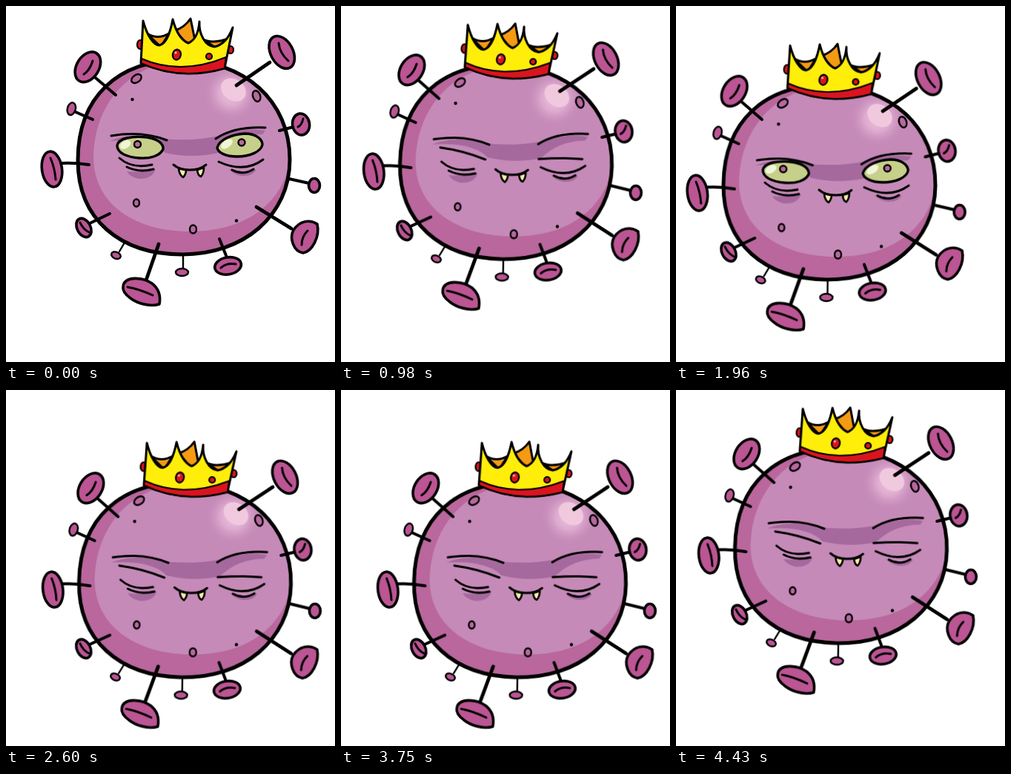
An HTML page that plays this animation: 444 px wide and 480 px high, repeating every 4.6 s.

```html
<!DOCTYPE html>
<html lang="en">
<head>
<meta charset="utf-8">
<title>Crowned virus</title>
<style>
  html, body { margin: 0; width: 100%; height: 100%; overflow: hidden; background: #fff; }
  svg { display: block; width: 444px; height: 480px; }
  .ink { fill: none; stroke: #000; stroke-linecap: round; stroke-linejoin: round; stroke-width: 3; }
  .pin { fill: #bb5593; stroke-width: 3.6; }
  .stem { stroke-width: 4; }
  .thin { stroke-width: 2.4; }
  .spot { fill: #b9689f; stroke-width: 2.4; }
  .shade { fill: #a5699e; }
  .eye { fill: #c6d08a; stroke-width: 3.4; }
  .gem { fill: #d9141f; stroke-width: 2.2; }
  .fang { fill: #f5eea6; stroke-width: 2.6; }

  #virus, #open, #closed { animation: 1150ms step-end infinite; }
  #virus { transform-origin: 240px 210px; animation-name: bob; }
  #open { animation-name: look; }
  #closed { animation-name: shut; }

  @keyframes bob {
    0% { transform: none; }
    11.304% { transform: translate(5px, 24px) rotate(.4deg); }
    26.087% { transform: translate(1.5px, 52.5px) rotate(1.1deg); }
    40.87% { transform: translate(7px, 68px) rotate(.8deg); }
    55.652% { transform: translate(-21.5px, 62.5px) rotate(1deg); }
    70.435% { transform: translate(-33px, 34px) rotate(.6deg); }
    85.217% { transform: translate(-17.5px, 6.5px) rotate(1.1deg); }
  }
  @keyframes look {
    0%, 55.652% { visibility: visible; }
    26.087%, 85.217%, 100% { visibility: hidden; }
  }
  @keyframes shut {
    0%, 55.652% { visibility: hidden; }
    26.087%, 85.217%, 100% { visibility: visible; }
  }
</style>
</head>
<body>
<svg viewBox="0 0 444 480">
  <defs>
    <path id="ball" d="M97 208C97 122 152 73 235 73C322 73 383 128 383 207C383 283 320 335 238 335C154 335 97 288 97 208Z"/>
    <clipPath id="inside"><use href="#ball"/></clipPath>
    <radialGradient id="glow">
      <stop offset="0" stop-color="#efc6e1"/>
      <stop offset=".45" stop-color="#e2b0d3" stop-opacity=".85"/>
      <stop offset="1" stop-color="#c58ab8" stop-opacity="0"/>
    </radialGradient>
  </defs>

  <g id="virus">
    <use href="#ball" fill="#b9679d"/>
    <g clip-path="url(#inside)">
      <path fill="#c58ab8" d="M190 85C142 107 118 155 118 205C119 268 175 304 248 304C320 304 366 270 380 222L395 140L320 60H240Z"/>
      <circle cx="304" cy="117" r="39" fill="url(#glow)"/>
      <ellipse cx="307" cy="113" rx="18" ry="14" transform="rotate(35 307 113)" fill="#f1c9de"/>
    </g>
    <use href="#ball" class="ink" style="stroke-width:5"/>

    <!-- spikes -->
    <g class="ink stem">
      <path d="M121 97L148 120M75 212Q92 211 112 214M113 293L140 280M298 339L288 314M388 163L369 168"/>
      <path d="M356 76L311 107M385 300L338 271M190 367L206 321" stroke-width="4.8"/>
      <path class="thin" d="M153 331L160 319M239 353V338"/>
      <path d="M94 143L117 153M409 239L382 233"/>
    </g>
    <g class="ink pin">
      <ellipse cx="110.500" cy="82" rx="15" ry="22" transform="rotate(32 110 82)"/>
      <ellipse class="thin" cx="88.500" cy="138.500" rx="5.500" ry="8.500" transform="rotate(15 88 138)"/>
      <ellipse cx="62" cy="220" rx="13.500" ry="24" transform="rotate(-8 62 220)"/>
      <ellipse cx="105" cy="299" rx="9" ry="13.500" transform="rotate(-28 105 299)"/>
      <ellipse class="thin" cx="148.500" cy="336" rx="6.500" ry="4.500" transform="rotate(22 148 336)"/>
      <path d="M158 378C160 364 184 365 197 374C206 381 209 391 207 402C195 406 177 401 168 394C161 389 157 384 158 378Z"/>
      <ellipse class="thin" cx="237.500" cy="359" rx="8.500" ry="5"/>
      <ellipse cx="299.500" cy="350.500" rx="18" ry="11.500" transform="rotate(-10 299 350)"/>
      <path d="M420 294C424 311 413 331 401 333C388 331 382 313 388 302C396 290 409 287 420 294Z"/>
      <ellipse cx="416" cy="242" rx="7.500" ry="9.500"/>
      <ellipse cx="398" cy="159.500" rx="11.500" ry="14.500" transform="rotate(-8 398 159)"/>
      <ellipse cx="372" cy="62.500" rx="15" ry="23.500" transform="rotate(-28 372 62)"/>
    </g>
    <path class="ink" d="M105 92Q113 87 117 74M60 205Q66 219 67 234M100 292Q104 301 112 305M164 379Q178 381 198 390M290 353Q298 346 310 348M399 322Q399 311 407 303M394 163Q399 161 401 152M368 50Q369 63 381 74"/>

    <!-- spots -->
    <g class="ink spot">
      <ellipse cx="176" cy="98" rx="7.500" ry="5" transform="rotate(-35 176 98)"/>
      <ellipse cx="338" cy="121.500" rx="5" ry="7.500" transform="rotate(-20 338 121)"/>
      <ellipse cx="176" cy="265.500" rx="4" ry="5"/>
      <ellipse cx="252.500" cy="301" rx="4.500" ry="5.500"/>
    </g>
    <circle cx="170.500" cy="126" r="2.200"/>
    <circle cx="311" cy="289.500" r="2.200"/>

    <!-- face -->
    <path class="shade" d="M140 182Q165 171 200 177Q245 185 292 174Q320 163 350 168L346 173Q310 174 287 198Q250 206 215 198Q195 178 140 182Z"/>
    <path class="shade" d="M163 223Q180 225 202 220Q198 233 180 233Q168 231 163 223ZM301 220Q320 226 338 220Q333 230 318 229Q306 227 301 220Z"/>
    <g class="ink">
      <path d="M153 205Q170 220 197 214M163 217Q179 225 199 220M287 210Q322 226 347 207M305 221Q320 229 334 220"/>
      <path class="fang" d="M233 219Q234 228 239 231Q243 227 243 221ZM258 221Q259 229 263 230Q267 226 267 218Z"/>
      <path d="M226 214Q234 221 248 221Q262 221 270 214"/>
    </g>
    <path class="ink" stroke-width="3.600" d="M142 175Q184 168 217 181M283 179Q308 162 350 164"/>

    <g id="open">
      <g class="ink">
        <path class="eye" d="M150 188C152 178 170 175 190 177C205 179 213 186 212 193C208 202 195 206 180 205C163 204 150 198 150 188Z"/>
        <path class="eye" d="M285 191C288 180 305 173 322 172C338 172 346 180 346 187C344 196 330 203 312 203C297 203 286 198 285 191Z"/>
      </g>
      <g fill="#f1f5d8">
        <ellipse cx="161" cy="187" rx="8" ry="5" transform="rotate(-30 161 187)"/>
        <ellipse cx="298" cy="186" rx="9" ry="5" transform="rotate(-35 298 186)"/>
      </g>
      <g class="ink spot">
        <circle cx="177.500" cy="186.500" r="4.500"/>
        <circle cx="318" cy="184" r="4.500"/>
      </g>
    </g>

    <path id="closed" class="ink" d="M151 186Q184 190 212 201M284 199Q312 196 343 198"/>

    <!-- crown -->
    <g class="ink">
      <ellipse class="gem" cx="181" cy="52" rx="4" ry="6"/>
      <ellipse class="gem" cx="303" cy="59" rx="4" ry="5"/>
      <path fill="#f59a13" d="M190 37Q205 46 220 37L209 55ZM228 33Q241 29 249 17L255 46L245 52ZM262 43Q278 53 302 43L283 56Z"/>
      <path fill="#ffed0a" d="M185 20C190 39 199 53 207 53C216 51 222 35 225 18C229 33 236 46 246 50C256 46 260 34 261 21C260 38 269 54 281 55C293 53 301 42 306 29L295 84Q235 101 182 77Z"/>
      <path class="gem" d="M183 71Q236 94 297 69L295 84Q235 101 182 77Z"/>
      <ellipse class="gem" cx="230.500" cy="65.500" rx="5.500" ry="7" transform="rotate(12 230 65)"/>
      <circle class="gem" cx="274" cy="68" r="4"/>
    </g>
    <circle cx="229" cy="63" r="1.600" fill="#ffb9b4"/>
  </g>
</svg>
</body>
</html>
```
